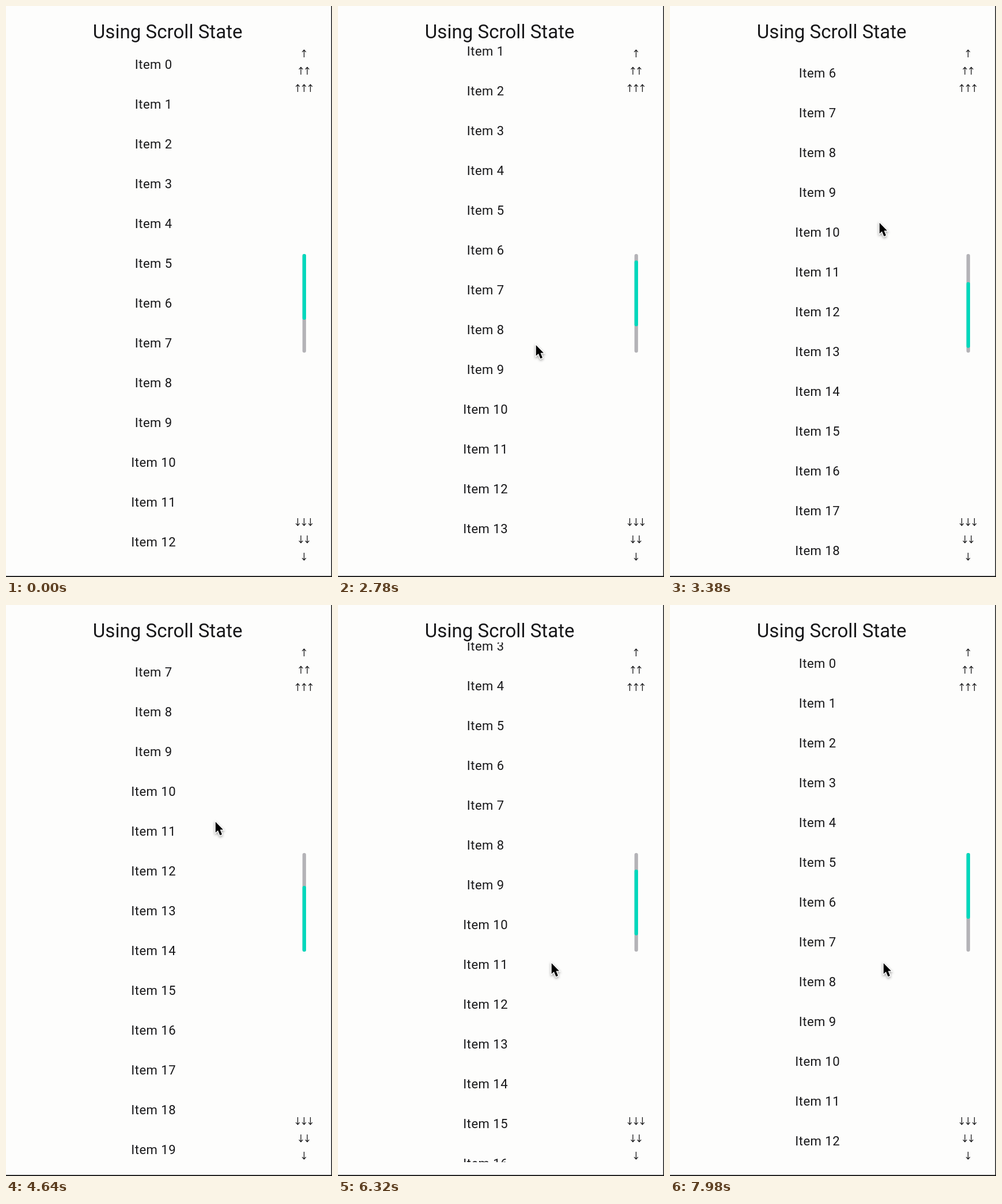
Recreate the animation shown at these times as an HTML page with a canvas. Size 566 by 990 pixels, loop 8000 ms.

```html
<!DOCTYPE html>
<html lang="en">
<head>
<meta charset="utf-8">
<title>Using Scroll State</title>
<style>
  html, body { margin: 0; width: 100%; height: 100%; overflow: hidden; background: #fdfdfc; }
  canvas { display: block; }
</style>
</head>
<body>
<canvas id="stage" width="566" height="990"></canvas>
<script>
const ctx = document.getElementById('stage').getContext('2d');
const LOOP = 8000;
const MAX_SCROLL = 467.5;
const INK = '#18181a';

// Keys: time, x, y of the pointer tip
const pointerKeys = [
  [20, 470, 995], [300, 420, 880], [560, 370, 760], [820, 349, 718], [980, 347, 717],
  [1520, 347, 717], [1700, 343, 717], [2360, 343, 717], [2560, 343, 660], [2780, 343, 587],
  [2980, 349, 515], [3140, 356, 445], [3260, 363, 375], [5300, 363, 375], [5700, 363, 418],
  [5860, 363, 443], [6040, 365, 515], [6120, 367, 562], [6200, 370, 620]
];
// Keys: time, list offset; each drag ends in a fling
const scrollKeys = [
  [2500, 0], [2780, 92], [2980, 164], [3140, 234], [3260, 304], [3380, 399], [3480, MAX_SCROLL],
  [5900, MAX_SCROLL], [6040, 415], [6120, 368], [6200, 310], [6320, 236.5],
  [6460, 155], [6600, 85], [6720, 35], [6820, 0]
];

function sample(keys, t) {
  const next = keys.findIndex(key => key[0] > t);
  if (next === 0) return keys[0].slice(1);
  if (next < 0) return keys[keys.length - 1].slice(1);
  const a = keys[next - 1], b = keys[next];
  const k = (t - a[0]) / (b[0] - a[0]);
  return a.slice(1).map((v, i) => v + (b[i + 1] - v) * k);
}

// The picture is held in a repeating 20 / 100 / 20 ms rhythm
function holdTime(t) {
  const phase = t % 140;
  return t - phase + (phase < 20 ? 0 : phase < 120 ? 20 : 120);
}

function text(str, x, baseline, size, spacing) {
  ctx.font = `${size}px Roboto, sans-serif`;
  ctx.letterSpacing = `${spacing}px`;
  ctx.textAlign = 'center';
  ctx.fillStyle = INK;
  ctx.fillText(str, x, baseline);
}

function bar(y, height, color) {
  ctx.fillStyle = color;
  ctx.beginPath();
  ctx.roundRect(514.7, y, 6.2, height, 3);
  ctx.fill();
}

function arrows(count, y, dir) {
  ctx.strokeStyle = INK;
  ctx.lineWidth = 1.3;
  ctx.beginPath();
  for (let i = 0; i < count; i++) {
    const x = 517.5 + (i - (count - 1) / 2) * 11;
    ctx.moveTo(x, y - 6.5 * dir);
    ctx.lineTo(x, y + 6.5 * dir);
    ctx.moveTo(x - 3.3, y + 2.6 * dir);
    ctx.lineTo(x, y + 6.2 * dir);
    ctx.lineTo(x + 3.3, y + 2.6 * dir);
  }
  ctx.stroke();
}

const pointerShape = new Path2D('M0 0V18.5L4.2 14.7L7.7 23.2L11.2 21.7L7.8 13.6H13.2Z');

function pointer(x, y) {
  ctx.save();
  ctx.translate(x + 0.8, y + 1);
  ctx.shadowColor = 'rgba(0,0,0,.4)';
  ctx.shadowBlur = 4;
  ctx.shadowOffsetY = 2;
  ctx.lineWidth = 2.6;
  ctx.strokeStyle = '#fff';
  ctx.stroke(pointerShape);
  ctx.shadowColor = 'transparent';
  ctx.fillStyle = '#000';
  ctx.fill(pointerShape);
  ctx.restore();
}

function list(scroll) {
  ctx.save();
  ctx.beginPath();
  ctx.rect(0, 65, 500, 901);
  ctx.clip();
  for (let i = 0; i < 20; i++) text(`Item ${i}`, 256.2, 108.5 + i * 69 - scroll, 22.08, 0.45);
  ctx.restore();
}

function draw(now) {
  const t = holdTime(now % LOOP);
  const [scroll] = sample(scrollKeys, t);

  ctx.fillStyle = '#fdfdfc';
  ctx.fillRect(0, 0, 566, 990);
  list(scroll);
  text('Using Scroll State', 280.7, 56, 33.12, 0);

  for (let n = 1; n <= 3; n++) {
    arrows(n, 52.5 + 30 * n, -1);
    arrows(n, 984.5 - 30 * n, 1);
  }
  bar(430, 171, '#b4b3b7');
  bar(430 + scroll / MAX_SCROLL * 57, 114, '#00d8bc');

  ctx.fillStyle = '#111';
  ctx.fillRect(564.6, 0, 1.4, 990);
  ctx.fillRect(0, 988.2, 566, 1.8);
  if (t > 0) pointer(...sample(pointerKeys, t));
}

const start = performance.now();
function tick() {
  draw(performance.now() - start);
  requestAnimationFrame(tick);
}
tick();
</script>
</body>
</html>
```
